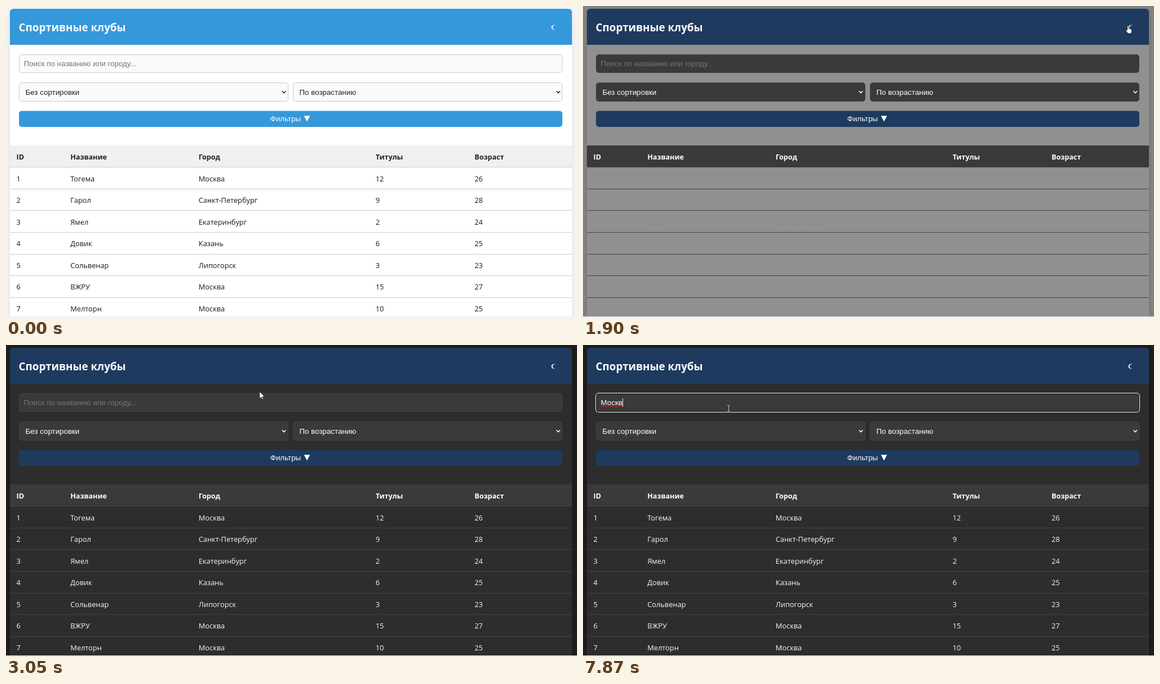
These frames come from a looping animation (1013x553 px, 8000 ms). An HTML page:

```html
<!DOCTYPE html>
<html lang="ru">
<head>
<meta charset="utf-8">
<title>Спортивные клубы</title>
<style>
html, body { margin: 0; width: 100%; height: 100%; overflow: hidden; }
svg { display: block; width: 100vw; height: 100vh;
  --head: #3498db; --field: #fafafa; --edge: #ccc; --th: #f0f0f0; --line: #ccc; --ink: #222; }
svg.dark { --head: #1e3a5f; --field: #3a3a3a; --edge: #444; --th: #3a3a3a; --line: #444; --ink: #fff; }
text { white-space: pre; }
.ui { font: 13.33px "Liberation Sans", Arial, sans-serif; fill: var(--ink); }
.cell { font: 12.8px "Open Sans", "Noto Sans", sans-serif; }
.th { font: 700 12.6px "Open Sans", "Noto Sans", sans-serif; fill: var(--ink); }
.title { font: 700 18.8px "Open Sans", "Noto Sans", sans-serif; fill: #fff; }
.head { fill: var(--head); }
.field { fill: var(--field); stroke: var(--edge); }
.line { fill: var(--line); }
.chevron { fill: none; stroke: var(--ink); stroke-width: 1.5; }
#card { filter: drop-shadow(0 3px 5px rgba(0, 0, 0, .1)); }
.pointer { fill: #fff; stroke: #111; stroke-width: .9; stroke-linejoin: round; }
</style>
</head>
<body>
<svg id="stage" viewBox="0 0 1013 553" preserveAspectRatio="none">
  <rect id="page" width="1013" height="553"/>
  <rect id="card" x="7" y="5" width="997" height="590" rx="6.5"/>
  <path class="head" d="M7 69V11.5Q7 5 13.5 5H997.5Q1004 5 1004 11.5V69Z"/>
  <text class="title" x="22.6" y="45.4">Спортивные клубы</text>
  <path fill="#fff" d="M974.6 33.9C970.5 33 967.6 35 967.6 38S970.5 43 974.6 42.1C971.5 41.8 969.6 40.4 969.6 38S971.5 34.2 974.6 33.9Z"/>

  <rect class="field" x="23.5" y="86.5" width="963" height="32" rx="4.5"/>
  <g id="focus" fill="none">
    <rect x="23.5" y="86.5" width="963" height="32" rx="4" stroke="#161616"/>
    <rect x="22.5" y="85.5" width="965" height="34" rx="5" stroke="#fff"/>
  </g>
  <text id="hint" class="ui" x="31.6" y="107.3" style="fill:#757575">Поиск по названию или городу...</text>
  <text id="query" class="ui" x="31.6" y="107.3"></text>
  <path id="wave" fill="none" stroke="#e02020" stroke-width=".9"/>
  <rect id="caret" y="95" width="1" height="15" fill="#fff"/>

  <rect class="field" x="23.5" y="136.5" width="477" height="33" rx="4.5"/>
  <rect class="field" x="509.5" y="136.5" width="477" height="33" rx="4.5"/>
  <text class="ui" x="34.5" y="157.8">Без сортировки</text>
  <text class="ui" x="520.5" y="157.8">По возрастанию</text>
  <path class="chevron" d="M489.7 151.2L493 154.6L496.3 151.2M976.5 151.2L979.8 154.6L983.1 151.2"/>

  <rect class="head" x="23" y="186.5" width="964" height="28.5" rx="5"/>
  <text class="ui" x="468.8" y="205.2" style="fill:#fff">Фильтры</text>
  <path fill="#fff" d="M528.6 195.3H539.4L534 205.6Z"/>

  <rect x="7" y="248" width="997" height="38.5" style="fill:var(--th)"/>
  <g id="header"></g>
  <g id="lines"></g>
  <g id="rows"></g>
  <rect y="552" width="1013" height="1" fill="#e8eaee"/>

  <circle id="click" r="10.2" fill="#ff0" fill-opacity=".5"/>
  <path id="arrow" class="pointer" d="M0 0V13L3 10.2L5 14.6L7 13.7L5.1 9.5H9.2Z"/>
  <path id="hand" class="pointer" d="M-.5 1.2C-.5 -.2 2 -.2 2 1.2V5.2L4 5.4Q4.4 5 5 5.7L6 5.9Q7.6 6 7.6 7.6V10Q7.6 11.8 6.6 12.6V14H.2V13L-2.6 9.4C-3.6 7.8 -2 6.8 -.5 8.2Z"/>
  <path id="beam" fill="none" stroke="#c4c4c4" stroke-width="1" d="M-2.5 -5H-.5L0 -4.5L.5 -5H2.5M0 -4.5V4.5M-2.5 5H-.5L0 4.5L.5 5H2.5"/>
</svg>
<script>
const LOOP = 8000, TICK = 66.6;
const $ = id => document.getElementById(id);
const columns = [18.6, 114.2, 341.8, 655.8, 831.3];
const table = [
  ["1", "Тогема", "Москва", "12", "26"],
  ["2", "Гарол", "Санкт-Петербург", "9", "28"],
  ["3", "Ямел", "Екатеринбург", "2", "24"],
  ["4", "Довик", "Казань", "6", "25"],
  ["5", "Сольвенар", "Липогорск", "3", "23"],
  ["6", "ВЖРУ", "Москва", "15", "27"],
  ["7", "Мелторн", "Москва", "10", "25"]
];

function add(parent, tag, attrs, text = "") {
  const node = document.createElementNS("http://www.w3.org/2000/svg", tag);
  for (const key in attrs) node.setAttribute(key, attrs[key]);
  node.textContent = text;
  parent.append(node);
}

function addRow(parent, cells, y, cls) {
  cells.forEach((text, i) => add(parent, "text", { x: columns[i], y, class: cls }, text));
}

addRow($("header"), ["ID", "Название", "Город", "Титулы", "Возраст"], 272.8, "th");
table.forEach((cells, i) => {
  addRow($("rows"), cells, 311.6 + 38.55 * i, "cell");
  add($("lines"), "rect", { x: 7, y: Math.round(286 + 38.65 * i), width: 997, height: 1, class: "line" });
});

let zigzag = "M32 110";
for (let x = 34, up = true; x <= 70; x += 2, up = !up) zigzag += `L${x} ${up ? 108.6 : 110}`;
$("wave").setAttribute("d", zigzag);

const mix = (a, b, p) => a + (b - a) * p;
const grey = (a, b, p) => { const v = Math.round(mix(a, b, p)); return `rgb(${v},${v},${v})`; };
const between = (t, a, b) => t >= a && t < b;
const hold = (t, origin) => origin + Math.floor((t - origin) / TICK) * TICK;
const show = (id, on) => $(id).setAttribute("visibility", on ? "visible" : "hidden");

// CSS "ease": cubic-bezier(.25, .1, .25, 1)
function ease(x) {
  if (x <= 0) return 0;
  if (x >= 1) return 1;
  const curve = (s, a, b) => 3 * s * (1 - s) * (1 - s) * a + 3 * s * s * (1 - s) * b + s * s * s;
  let lo = 0, hi = 1;
  for (let i = 0; i < 24; i++) {
    const mid = (lo + hi) / 2;
    if (curve(mid, .25, .25) < x) lo = mid; else hi = mid;
  }
  return curve(lo, .1, 1);
}

// time, x, y of the pointer's hot spot
const track = [
  [70, 844, 545], [300, 874, 430], [600, 940, 140], [830, 964, 37],
  [900, 964, 37], [1030, 964, 36], [1300, 964, 36], [1370, 966, 35],
  [2430, 966, 35], [2620, 925, 40], [2900, 610, 66], [3130, 310, 97], [3260, 261, 106],
  [3340, 259, 109], [3410, 257.5, 112.5], [7339, 257.5, 112.5], [7340, 258.5, 112.5], [LOOP, 258.5, 112.5]
];

function pointerAt(t) {
  const i = Math.max(1, track.findIndex(k => k[0] >= t));
  const [t0, x0, y0] = track[i - 1], [t1, x1, y1] = track[i];
  const p = (t - t0) / (t1 - t0);
  return [mix(x0, x1, p), mix(y0, y1, p)];
}

const keys = [4610, 5340, 6070, 6410, 6810];
const caretX = [32, 43, 50, 57, 63, 70];
const caretOn = [[3480, 4010], [4540, 5140], [5340, 5880], [6070, 7270], [7870, LOOP]];

function draw(t) {
  const fade = ease((hold(t, 1830) - 1804) / 300);
  $("stage").classList.toggle("dark", t >= 1830);
  $("page").style.fill = grey(245, 30, fade);
  $("card").style.fill = grey(255, 45, fade);
  $("rows").style.fill = grey(24, 248, fade);

  const typed = keys.filter(k => t >= k).length;
  $("query").textContent = "Москв".slice(0, typed);
  $("caret").setAttribute("x", caretX[typed]);
  show("hint", !typed);
  show("focus", t >= 3480);
  show("caret", caretOn.some(([a, b]) => between(t, a, b)));
  show("wave", t >= 7870);

  // The pointer is sampled in ticks while it travels.
  let time = t;
  if (between(t, 70, 830)) time = hold(t, 70);
  else if (between(t, 2430, 2490)) time = 2430;
  else if (between(t, 2490, 3260)) time = hold(t, 2490);
  const [x, y] = pointerAt(time);
  const onButton = x > 955 && y < 53;
  const onField = y > 86 && t > 2490;
  for (const id of ["arrow", "hand", "beam", "click"]) $(id).setAttribute("transform", `translate(${x} ${y})`);
  show("hand", t >= 70 && onButton);
  show("beam", onField);
  show("arrow", t >= 70 && !onButton && !onField);
  show("click", between(t, 1700, 1830) || between(t, 3480, 3610));
}

let start;
function loop(now) {
  start ??= now;
  draw((now - start) % LOOP);
  requestAnimationFrame(loop);
}
draw(0);
requestAnimationFrame(loop);
</script>
</body>
</html>
```
